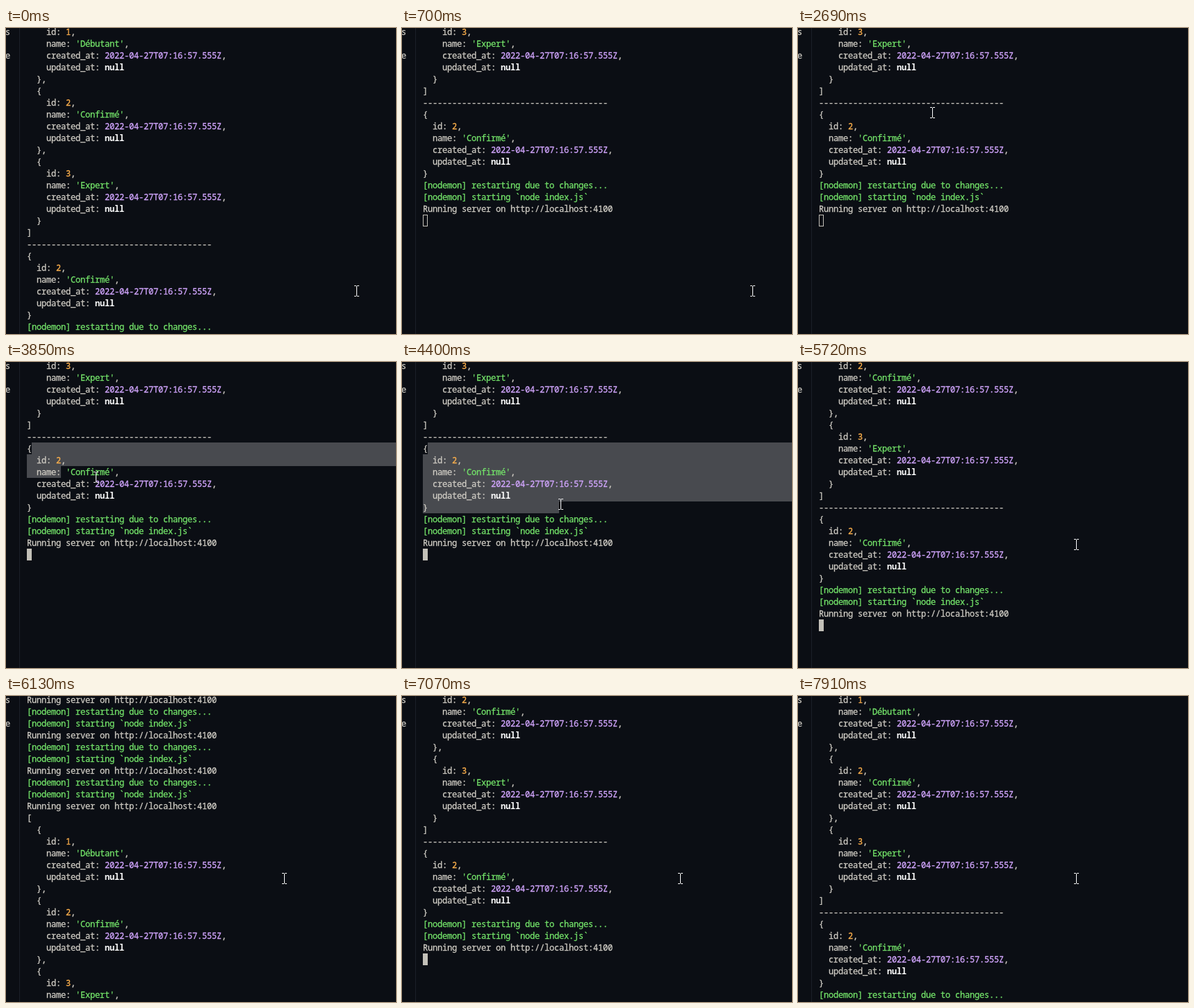
Write an HTML page with a canvas that moves like this. It is 561 by 441 pixels and loops after 8 s.

```html
<!DOCTYPE html>
<html lang="en">
<head>
<meta charset="utf-8">
<title>Terminal</title>
<style>
  html, body { margin: 0; overflow: hidden; background: #0b0e14; }
  canvas { display: block; }
</style>
</head>
<body>
<canvas id="stage" width="561" height="441"></canvas>
<script>
const ctx = document.getElementById('stage').getContext('2d');
const LOOP = 8000, TICK = 143, ROW = 17, COL = 7, LEFT = 30, TOP = -3, WIDTH = 561, HEIGHT = 441;
const FONT = '12px "Noto Sans Mono", monospace';
const C = { bg: '#0b0e14', fg: '#cfccc4', cursor: '#c3c0b8', green: '#74e46a', yellow: '#fdb04c',
            violet: '#d2a6ff', border: '#1b2028', selection: '#484a4f' };

// Log contents
const boot = [
  '[nodemon] restarting due to changes...',
  '[nodemon] starting `node index.js`',
  'Running server on http://localhost:4100'
];
const record = (id, name, pad = '', end = '') => [
  '{', `  id: ${id},`, `  name: '${name}',`,
  '  created_at: 2022-04-27T07:16:57.555Z,', '  updated_at: null', '}' + end
].map(line => pad + line);
const lines = [
  ...boot, ...boot, ...boot, ...boot,
  '[', ...record(1, 'Débutant', '  ', ','), ...record(2, 'Confirmé', '  ', ','),
  ...record(3, 'Expert', '  '), ']',
  '-'.repeat(38), ...record(2, 'Confirmé'), ...boot
];
const BASE = 14; // line at the top when scroll is 0

// Each wheel notch scrolls six lines
const wheelDown = [430, 700, 6780, 6920, 7070, 7190];
const wheelUp = [5720, 5870, 6130, 6130, 7620, 7910];

// Pointer moves: start, steps, x, y
const moves = [
  [2690, 1, 193, 122], [2840, 2, 3, 133], [3120, 1, 29, 140], [3270, 4, 37, 134],
  [3850, 1, 129, 166], [3970, 4, 228, 205], [4870, 1, 365, 225], [5280, 1, 400, 263]
];

const passed = (times, t) => times.filter(time => time <= t).length;
const between = (t, from, to) => t >= from && t < to;
const mix = (a, b, u) => Math.round(a + (b - a) * u);

// Stepped ease-out from 0 to 1
function glide(t, start, steps) {
  if (t < start) return 0;
  const u = Math.min(1, (Math.floor((t - start) / TICK) + 1) / steps);
  return 1 - (1 - u) ** 2;
}

function rect(color, x, y, w, h) {
  ctx.fillStyle = color;
  ctx.fillRect(x, y, w, h);
}

// One character per terminal cell
function text(str, x, row, color, bold) {
  ctx.font = (bold ? 'bold ' : '') + FONT;
  ctx.fillStyle = ctx.strokeStyle = color;
  ctx.lineWidth = 0.3;
  [...str].forEach((char, i) => {
    const at = [char, x + i * COL, TOP + 13 + row * ROW];
    ctx.fillText(...at);
    if (!bold) ctx.strokeText(...at);
  });
}

function drawLine(line, row) {
  if (line.startsWith('[n')) return text(line, LEFT, row, C.green);
  let col = 0;
  for (const part of line.split(/('.*?'|\d{4}-.*Z|null|(?<=id: )\d)/)) {
    const bold = part === 'null';
    const color = bold ? '#fff' : part[0] === "'" ? C.green
      : /^\d$/.test(part) ? C.yellow : /^\d{4}-/.test(part) ? C.violet : C.fg;
    text(part, LEFT + col * COL, row, color, bold);
    col += part.length;
  }
}

function drawSelection(t) {
  const u = glide(t, 3970, 4), startRow = 7, endRow = mix(9, 12, u), endCol = mix(7, 28, u);
  for (let row = startRow; row <= endRow; row++) {
    const x = row === startRow ? LEFT + COL : LEFT;
    const right = row === endRow ? LEFT + endCol * COL : WIDTH;
    rect(C.selection, x, TOP + row * ROW, right - x, ROW);
  }
}

function drawPointer(t) {
  let x = 504, y = 379;
  for (const [start, steps, toX, toY] of moves) {
    const u = glide(t, start, steps);
    x = mix(x, toX, u);
    y = mix(y, toY, u);
  }
  for (const edge of [y - 8, y + 7]) {
    rect('#fff', x - 3, edge, 3, 1);
    rect('#fff', x + 1, edge, 3, 1);
  }
  rect('#fff', x, y - 7, 1, 14);
}

function draw(t) {
  rect(C.bg, 0, 0, WIDTH, HEIGHT);
  rect(C.border, 19, 0, 1, HEIGHT);
  text('s', -1, 0, C.fg);
  text('e', -1, 2, C.fg);

  if (between(t, 3850, 4700)) drawSelection(t);

  const first = BASE + 6 * (passed(wheelDown, t) - passed(wheelUp, t));
  lines.slice(first, first + 26).forEach(drawLine);

  const cursorY = TOP + (lines.length - first) * ROW;
  rect(C.cursor, LEFT, cursorY, COL, ROW);
  if (t < 3850) rect(C.bg, LEFT + 1, cursorY + 1, COL - 2, ROW - 2); // unfocused

  if (!between(t, 5000, 5280)) drawPointer(t);
}

const start = performance.now();
function tick() {
  draw((performance.now() - start) % LOOP);
  requestAnimationFrame(tick);
}
tick();
</script>
</body>
</html>
```
